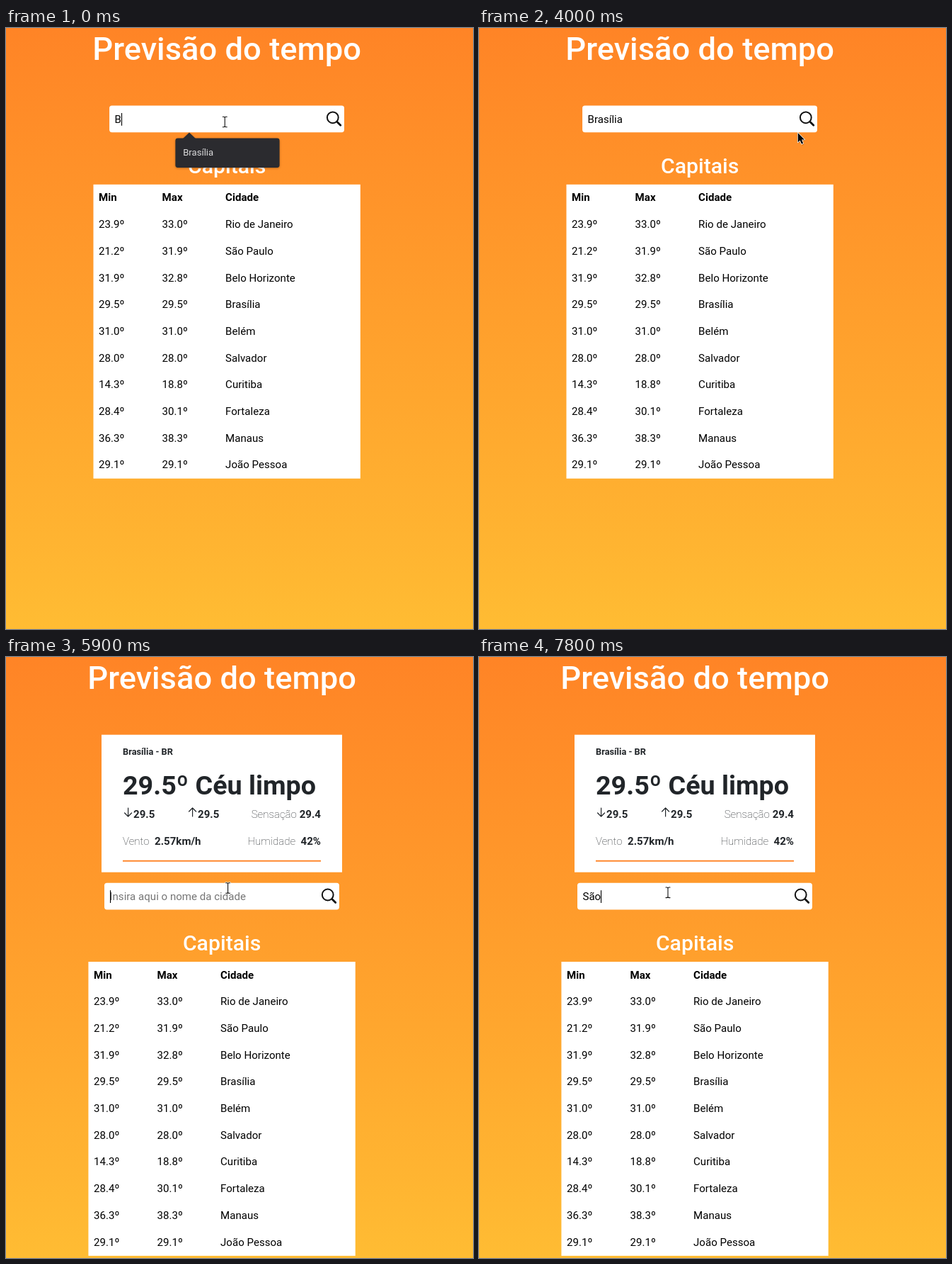
Recreate the animation shown at these times as an HTML page. Size 660 by 848 pixels, loop 8000 ms.

```html
<!DOCTYPE html>
<html lang="pt-BR">
<head>
<meta charset="utf-8">
<title>Previsão do tempo</title>
<style>
  html, body { margin: 0; width: 100%; height: 100%; overflow: hidden; }
  svg { display: block; width: 660px; height: 848px; font-family: Roboto, "Open Sans", sans-serif; font-size: 15.08px; }
  .title { font-size: 45.24px; font-weight: 500; fill: #fff; text-anchor: middle; }
  .sub { font-size: 30.16px; font-weight: 500; fill: #fff; text-anchor: middle; }
  .card { fill: #212529; }
  .bold { font-weight: 700; }
  .thin { font-weight: 100; }
  .end { text-anchor: end; }
  .line { fill: none; stroke-linecap: round; stroke-linejoin: round; }
</style>
</head>
<body>
<svg viewBox="0 0 660 848" xmlns="http://www.w3.org/2000/svg">
  <defs>
    <linearGradient id="sky" x1="0" y1="0" x2="0" y2="1">
      <stop offset="0" stop-color="#ff8426"/>
      <stop offset="1" stop-color="#ffbc33"/>
    </linearGradient>
    <path id="beam" d="M-3 -7.3H-1.6Q0 -7.3 0 -5.8V5.8Q0 7.3 -1.6 7.3H-3M3 -7.3H1.6Q0 -7.3 0 -5.8M0 5.8Q0 7.3 1.6 7.3H3"/>
  </defs>
  <rect width="660" height="848" fill="url(#sky)"/>
  <text id="title" class="title" x="312.2" y="45">Previsão do tempo</text>

  <g id="card" class="card">
    <rect x="135" y="109.7" width="340" height="194" fill="#fff"/>
    <text class="bold" x="165" y="137.8" font-size="12.8">Brasília - BR</text>
    <text class="bold" x="165" y="193.8" font-size="37.7">29.5º Céu limpo</text>
    <g class="line" stroke="#212529" stroke-width="1.2">
      <path d="M172.6 213V225M167.6 220L172.6 225L177.6 220"/>
      <path d="M263.6 225V213M258.6 218L263.6 213L268.6 218"/>
    </g>
    <text class="bold" x="180" y="227.4">29.5</text>
    <text class="bold" x="271" y="227.4">29.5</text>
    <text class="thin end" x="410.8" y="227.4">Sensação</text>
    <text class="bold end" x="445" y="227.4">29.4</text>
    <text class="thin" x="165" y="265">Vento</text>
    <text class="bold" x="210" y="265">2.57km/h</text>
    <text class="thin end" x="409" y="265">Humidade</text>
    <text class="bold end" x="445" y="265">42%</text>
    <rect x="165" y="286.8" width="280" height="1.9" fill="#ff8426"/>
  </g>

  <g id="main">
    <rect x="146.1" y="109.5" width="331.9" height="37.7" rx="3.6" fill="#fff"/>
    <text id="hint" x="153.5" y="133.6" fill="#757575">Insira aqui o nome da cidade</text>
    <text id="value" x="153.5" y="133.6"></text>
    <rect id="caret" y="120" width="1.1" height="17.8"/>
    <g class="line" stroke="#111">
      <circle cx="461.8" cy="126.3" r="7.9" stroke-width="2"/>
      <path d="M468 132.5L472.8 137.3" stroke-width="2.8"/>
    </g>
    <text class="sub" x="312.2" y="205.3">Capitais</text>
    <rect x="123.5" y="220.8" width="377.3" height="414.9" fill="#fff"/>
    <g id="table"></g>
    <g id="popup">
      <g style="filter:drop-shadow(0 1.5px 1.5px rgba(0,0,0,.3))" fill="#2b2b2f">
        <rect x="-73.6" y="-20.4" width="147.2" height="41.3" rx="3.4"/>
        <path d="M-63 -20L-54 -28.4L-45 -20Z"/>
      </g>
      <text x="-62.8" y="4.3" font-size="13.1" fill="#dcdcdd">Brasília</text>
    </g>
  </g>

  <g id="arrow">
    <path d="M1 1.5V15L4.1 12.3L6.4 17.4L8.8 16.4L6.5 11.3H10.5Z" opacity=".2"/>
    <path d="M0 0V13.2L3 10.5L5.2 15.6L7.4 14.7L5.3 9.6H9.3Z" stroke="#fff" stroke-width="1.5" paint-order="stroke" stroke-linejoin="round"/>
  </g>
  <g id="ibeam" class="line">
    <use href="#beam" stroke="#fff" stroke-width="2.6"/>
    <use href="#beam" stroke="#111" stroke-width="1.1"/>
  </g>
</svg>
<script>
const LOOP = 8000, STEP = 100;
const RESULT_AT = 4100, FOCUS_AT = 4900, SUGGEST_AT = 6500, RETYPE_AT = 6800;
const SHIFT_X = -7.07, SHIFT_Y = 209.2, TEXT_X = 153.5;

const $ = id => document.getElementById(id);
const place = (el, x, y, s = 1) => el.setAttribute('transform', `translate(${x} ${y}) scale(${s})`);
const show = (el, on) => el.setAttribute('display', on ? 'inline' : 'none');
const clamp = v => Math.max(0, Math.min(1, v));

const rows = `Min|Max|Cidade
23.9º|33.0º|Rio de Janeiro
21.2º|31.9º|São Paulo
31.9º|32.8º|Belo Horizonte
29.5º|29.5º|Brasília
31.0º|31.0º|Belém
28.0º|28.0º|Salvador
14.3º|18.8º|Curitiba
28.4º|30.1º|Fortaleza
36.3º|38.3º|Manaus
29.1º|29.1º|João Pessoa`.split('\n');
$('table').innerHTML = rows.map((row, r) => row.split('|').map((cell, c) =>
  `<text x="${131.1 + 89.5 * c}" y="${244.4 + 37.7 * r}"${r ? '' : ' class="bold"'}>${cell}</text>`
).join('')).join('');

// One key per letter; an accent takes a key of its own.
function keyed(word, t, start, gap) {
  const keys = Math.floor((t - start) / gap) + 1;
  return [...word].filter((_, i) => word.slice(0, i + 1).normalize('NFD').length <= keys).join('');
}

const valueAt = t => t < RESULT_AT
  ? keyed('Brasília', t, 0, 200)
  : keyed('S', t, RETYPE_AT, 200) + keyed('ão', t, 7600, 100);

// The blink restarts at each pause in the typing.
function caretOn(t) {
  if (t < FOCUS_AT) return t < 2200;
  const since = [7700, RETYPE_AT, FOCUS_AT].find(start => t >= start);
  return (t - since) % 1000 < 600;
}

function popupAlpha(t) {
  if (t >= RESULT_AT && t < SUGGEST_AT) return 0;
  const fadeAt = t < RESULT_AT ? 1600 : RETYPE_AT;
  return t < fadeAt ? 1 : clamp(.75 - (t - fadeAt) / 200);
}

// Turning points of the pointer: [time, x, y]
const pointer = [
  [2100, 309.3, 132.5], [2400, 373.5, 122], [3800, 373.5, 122], [3900, 492, 140],
  [4000, 450.7, 148], [4100, 440.7, 164], [4700, 372, 148], [5100, 323.5, 290.5],
  [5400, 408, 362], [5500, 408, 362], [6000, 290, 317], [6400, 267, 332.3]
];

function pointerAt(t) {
  const i = Math.max(1, pointer.findIndex(p => p[0] > t));
  const next = t >= pointer.at(-1)[0] ? pointer.length - 1 : i;
  const [t0, x0, y0] = pointer[next - 1], [t1, x1, y1] = pointer[next];
  const k = clamp((t - t0) / (t1 - t0));
  return [x0 + (x1 - x0) * k, y0 + (y1 - y0) * k];
}

function draw(t) {
  const result = t >= RESULT_AT;
  const dx = result ? SHIFT_X : 0, dy = result ? SHIFT_Y : 0;
  place($('title'), dx, 0);
  place($('main'), dx, dy);
  show($('card'), result);

  const text = valueAt(t);
  $('value').textContent = text;
  show($('hint'), !text);
  const width = text ? $('value').getComputedTextLength() : 0;
  $('caret').setAttribute('x', Math.floor(TEXT_X + dx + width + .6) - dx);
  show($('caret'), caretOn(t));

  const alpha = popupAlpha(t);
  $('popup').setAttribute('opacity', alpha);
  place($('popup'), 313, 176, .95 + .05 * alpha);

  const [x, y] = pointerAt(t);
  const inField = Math.abs(x - dx - 312.1) < 166 && Math.abs(y - dy - 128.5) < 18.9;
  place($('arrow'), x, y);
  place($('ibeam'), x, y);
  show($('arrow'), !inField);
  show($('ibeam'), inField);
}

const start = performance.now();
function tick() {
  const t = (performance.now() - start) % LOOP;
  draw(Math.floor(t / STEP) * STEP);
  requestAnimationFrame(tick);
}
tick();
</script>
</body>
</html>
```
